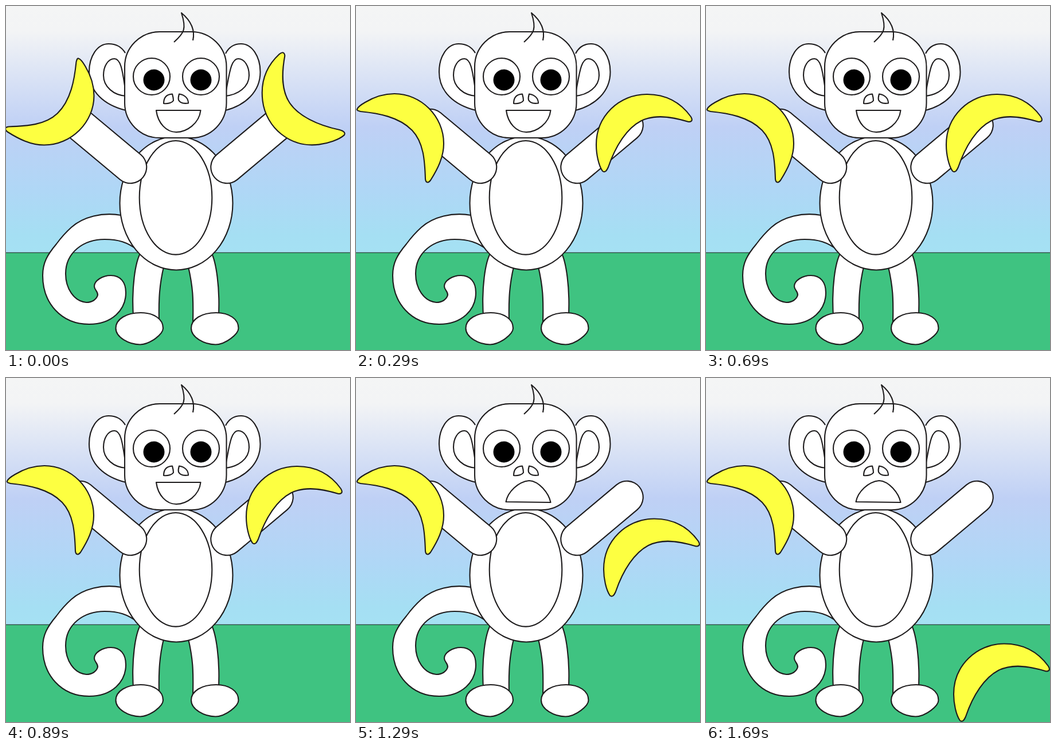
These frames come from a looping animation (600x600 px, 2090 ms). An HTML page:

```html
<!DOCTYPE html>
<html lang="en">
<head>
<meta charset="utf-8">
<title>Monkey with bananas</title>
<style>
  html, body { margin: 0; width: 100%; height: 100%; overflow: hidden; }
  svg { display: block; width: 100%; height: 100%; }
  .ink { fill: #fff; stroke: #1e1c1d; stroke-width: 2.1; stroke-linejoin: round; }
  .line { fill: none; }
  .banana { fill: #fdff41; }
  .arm path { stroke-linecap: round; fill: none; stroke: #1e1c1d; stroke-width: 58.6; }
  .arm path + path { stroke: #fff; stroke-width: 54.4; }
</style>
</head>
<body>
<svg viewBox="0 0 600 600">
  <defs>
    <linearGradient id="sky" x1="0" y1="0" x2="0" y2="1">
      <stop offset="0" stop-color="#f4f5f5"/>
      <stop offset=".1" stop-color="#f3f4f5"/>
      <stop offset=".49" stop-color="#bfd0f5"/>
      <stop offset=".75" stop-color="#afd7f6"/>
      <stop offset=".93" stop-color="#a5dff3"/>
      <stop offset="1" stop-color="#a5e1f3"/>
    </linearGradient>
  </defs>
  <rect width="600" height="430" fill="url(#sky)"/>
  <rect y="430" width="600" height="170" fill="#3fc381"/>
  <path d="M0 430.200H600" stroke="#1e1c1d"/>

  <g class="ink">
    <!-- tail -->
    <path d="M201 365C168 359 134 368 114 386C104 395 96 404 88 415C72 434 64 448 64 470C64 518 96 555 145 555C185 555 209 530 209 500C209 481 199 470 183 470C168 470 154 479 154 489C154 495 160 497 160 504C158 512 150 517 140 517C118 515 104 492 104 467C104 429 136 407 172 407C196 407 212 412 230 426"/>
    <!-- legs and feet -->
    <path d="M267 550C266 510 268 485 275 455L235 430C226 445 218 490 222.500 548"/>
    <path d="M326 552C327 510 326 490 318 455L358 430C366 445 374 490 370.500 548"/>
    <path id="foot" d="M191.500 562C191.500 546 210 535 235 535C258 535 274 546 274 562C274 572 252 590 234 590.500C214 590 191.500 578 191.500 562Z"/>
    <use href="#foot" x="131.500"/>
    <!-- body -->
    <ellipse cx="297" cy="344" rx="98.500" ry="116.500"/>
    <ellipse cx="296" cy="334.300" rx="63.300" ry="99.300"/>
    <!-- ears -->
    <path d="M208 82C201 70 190 66 179 66C159 66 145 88 145 115C145 150 172 173 209 182"/>
    <path d="M189 92C178 92 170 105 170 121C170 141 188 156 210 157C204 125 203 92 189 92Z"/>
    <path d="M383 83C389 71 398 66 410 66C429 66 443.500 88 443.500 115C443.500 150 417 173 383 182"/>
    <path d="M405 92C416 92 424 105 424 121C424 141 405 155 382 157C389 125 391 92 405 92Z"/>
    <!-- head -->
    <rect x="207" y="45" width="177.500" height="185" rx="61"/>
    <path class="line" d="M293 63C311 47 315 40 306 12C318 22 331 38 326 60"/>
    <circle cx="254" cy="123" r="32"/>
    <circle cx="340" cy="123" r="32"/>
    <path d="M290 153.500C280 154 275 160 275 170C284 171 290 168 292 165C292 160 291 157 290 153.500Z"/>
    <path d="M302 153.500C312 155 318 161 318 169.500C308 171 303 168 301 164C300 160 301 157 302 153.500Z"/>
    <path id="mouth"/>
  </g>
  <circle cx="258" cy="129" r="18.500"/>
  <circle cx="340" cy="129" r="18.500"/>

  <g class="arm"><path d="M217 281L129.500 208"/><path d="M217 281L129.500 208"/></g>
  <g class="arm"><path d="M385.500 281L472.500 208"/><path d="M385.500 281L472.500 208"/></g>

  <path id="left" class="ink banana" d="M2 180C3 176 9 172 16 168C31 159 47 153 67 153C113 153 153 192 153 240C153 264 142 285 130 304C126 309 122 309 121 302C120 270 118 238 98 217C75 193 38 187 8 184C4 183 1 182 2 180Z"/>
  <path id="right" class="ink banana" d="M584 193C587 198 587 202 580 202C548 192 520 189 497 200.500C473 213 453 243 440 281C437 288 434 291 430 288C423 278 419 258 419 242C419 192 459 154 507 154C540 154 566 168 584 193Z"/>
</svg>
<script>
const LOOP = 2090;
const SWINGS = [30, 60, 90, 190, 290, 390, 490, 590, 690, 790, 890, 990, 1090];
const FALL = [[1290, 91.5], [1490, 205.5], [1690, 309.5]];

const smile = 'M262 182H339.500C337 205 315 220 297 220C280 220 265 205 262 182Z';
const frown = 'M261.500 216L339.500 217C336 200 319 180 302 179C283 181 265 198 261.500 216Z';

const [mouth, left, right] = ['mouth', 'left', 'right'].map(id => document.getElementById(id));

function draw(t) {
  const raised = SWINGS.filter(at => at <= t).length % 2 === 0;
  const drop = FALL.filter(([at]) => at <= t).pop();
  left.setAttribute('transform', raised ? 'translate(306.5 89.5) rotate(90)' : '');
  right.setAttribute('transform',
    raised ? 'translate(356.5 687) rotate(-97)' :
    drop ? `translate(13 ${drop[1]})` : '');
  mouth.setAttribute('d', drop ? frown : smile);
}

let start;
function tick(now) {
  start ??= now;
  draw((now - start) % LOOP);
  requestAnimationFrame(tick);
}
draw(0);
requestAnimationFrame(tick);
</script>
</body>
</html>
```
